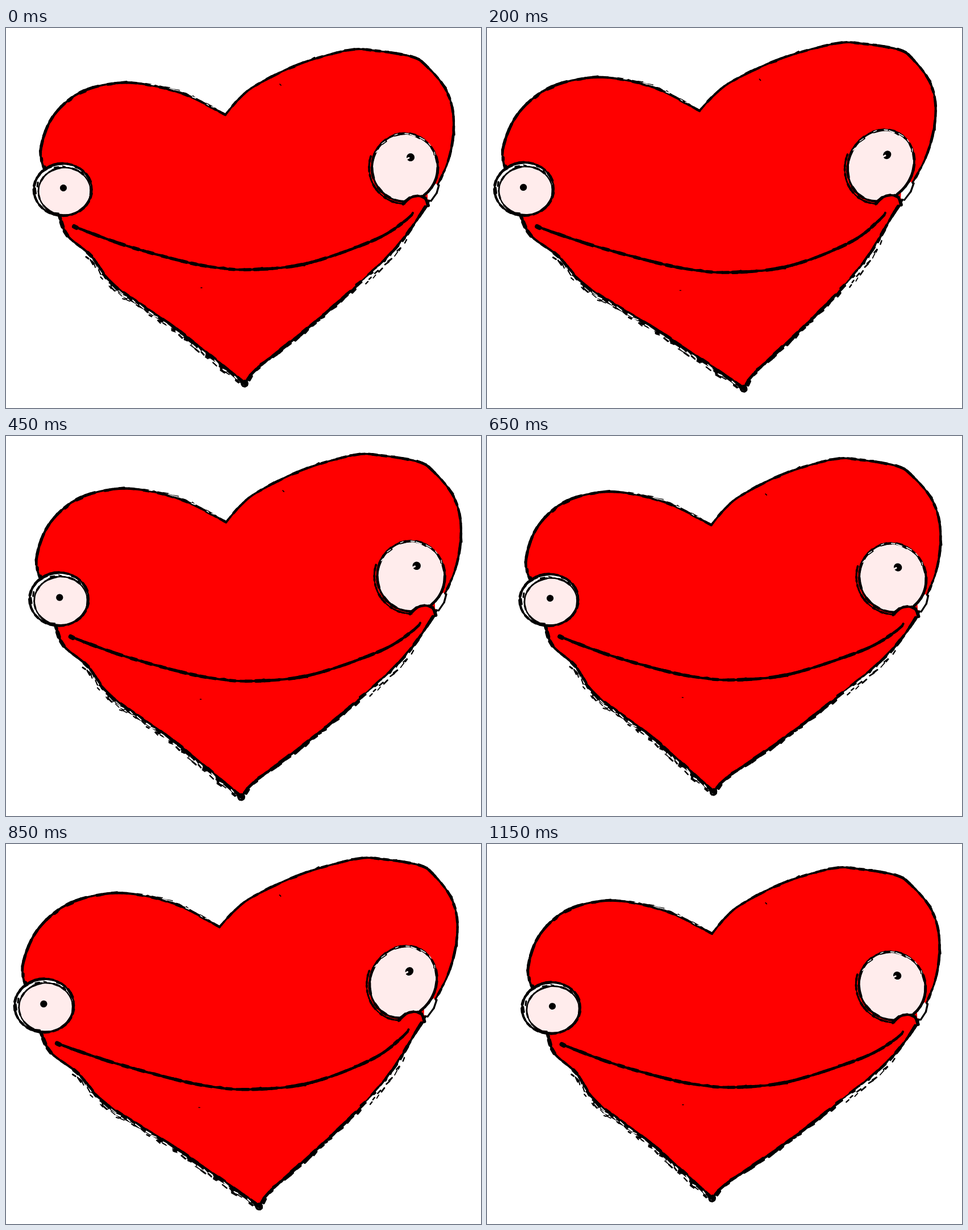
An HTML page with a canvas that plays this animation: 836 px wide and 670 px high, repeating every 1200 ms.

```html
<!DOCTYPE html>
<html lang="en">
<head>
<meta charset="utf-8">
<title>Wobbling heart</title>
<style>
html, body { margin: 0; width: 100%; height: 100%; overflow: hidden; background: #fff; }
canvas { display: block; }
</style>
</head>
<body>
<canvas id="stage" width="836" height="670"></canvas>
<script>
const ctx = document.getElementById('stage').getContext('2d');
const RED = '#f00', BLACK = '#000', WHITE = '#fff', PINK = '#ffecec';

// Landmark x, y, then its shift in three modes: lean left, settle, swing back
const marks = [
  [60, 215, -33, -2, 11, 6, -17, 0],    // left side
  [100, 285, -37, -1, 14, 4, -17, 3],   // left eye
  [255, 101, -15, -10, 5, 3, -8, -8],   // left lobe
  [386, 152, -12, -7, 10, 5, -2, -4],   // cleft
  [628, 39, 12, -12, 5, 4, 15, -11],    // right lobe
  [788, 158, 2, -10, 8, 5, 18, -6],     // right side
  [700, 246, -10, -3, 11, 4, 13, 1],    // right eye
  [716, 327, -15, 0, 16, 5, 15, 4],     // mouth corner
  [430, 426, -5, 5, 5, 3, 2, 9],        // mouth middle
  [187, 455, -15, 2, 3, 2, -10, 8],     // lower left
  [625, 449, 5, 6, -1, 4, 12, 11],      // lower right
  [420, 630, 32, 9, -24, -2, 0, 17]     // tip
];

// Time and amount of each mode
const keys = [
  [0, 0, 0, 0], [200, 1, 0, 0], [280, 0.35, 0, 1.3], [450, 0, 0.25, 0.6], [550, 0, 1, 0.1], [650, 0, 0.9, 0.15],
  [740, 0, 0, 0], [850, 0.8, 0, 0.3], [900, 0.35, 0, 1.35], [950, 0, 0, 1], [1050, 0, 0.4, 0.5], [1100, 0, 1, 0], [1200, 0, 1, 0]
];

function amounts(t) {
  const i = keys.findIndex(k => k[0] > t), a = keys[i - 1], b = keys[i];
  const u = (t - a[0]) / (b[0] - a[0]);
  return [1, 2, 3].map(m => a[m] + (b[m] - a[m]) * u);
}

// Radial weights spread the landmark shifts smoothly over the plane
const kernel = (a, b) => Math.hypot(a[0] - b[0], a[1] - b[1], 50);

function solve(rows, n) {
  for (let c = 0; c < n; c++) {
    const lead = rows[c] = rows[c].map(v => v / rows[c][c]);
    rows.forEach((row, r) => {
      if (r !== c) rows[r] = row.map((v, k) => v - row[c] * lead[k]);
    });
  }
  return rows.map(row => row.slice(n));
}
const weights = solve(marks.map(p => [...marks.map(q => kernel(p, q)), ...p.slice(2)]), marks.length);

const withModes = p => [...p, ...weights[0].map((_, j) =>
  marks.reduce((sum, q, k) => sum + kernel(p, q) * weights[k][j], 0))];

let seed = 11;
const rnd = (a = 0, b = 1) => {
  seed = (seed * 16807) % 2147483647;
  return a + (b - a) * seed / 2147483647;
};

const pairs = (...v) => v.flatMap((x, i) => i % 2 ? [] : [[x, v[i + 1]]]);

// Catmull-Rom samples through the points
function curve(...v) {
  const pts = pairs(...v), last = pts.length - 1, out = [];
  const at = i => pts[Math.max(0, Math.min(last, i))];
  for (let i = 0; i < last; i++) {
    const [p, q, r, s] = [at(i - 1), at(i), at(i + 1), at(i + 2)];
    const n = Math.ceil(Math.hypot(r[0] - q[0], r[1] - q[1]) / 9);
    for (let k = 0; k < n; k++) {
      const u = k / n;
      out.push([0, 1].map(d => q[d] + u / 2 * (r[d] - p[d] + u * (2 * p[d] - 5 * q[d] + 4 * r[d] - s[d]
        + u * (3 * (q[d] - r[d]) + s[d] - p[d])))));
    }
  }
  return [...out, pts[last]];
}

// Elliptic arc, angles in turns
function arc(x, y, rx, ry, from = 0, to = 1, n = 40) {
  return Array.from({ length: n + 1 }, (_, i) => {
    const a = 2 * Math.PI * (from + (to - from) * i / n);
    return [x + rx * Math.cos(a), y + ry * Math.sin(a)];
  });
}

const items = [];
const fill = (pts, color) => items.push({ pts: pts.map(withModes), color });
const ink = (pts, w, rough = 0.25, color = BLACK) =>
  items.push({ pts: pts.map(withModes), color, widths: pts.map(() => w * rnd(1 - rough, 1 + rough)) });

// Short broken strokes along part of a line, lo to hi pixels outside it
function scratch(line, from, to, count, lo, hi, w, color = BLACK) {
  for (let i = 0; i < count; i++) {
    const k = Math.floor((from + (to - from) * (i + rnd()) / count) * (line.length - 2));
    const [x, y] = line[k], [x2, y2] = line[k + 1], d = Math.hypot(x2 - x, y2 - y);
    const dx = (x2 - x) / d, dy = (y2 - y) / d;
    const len = rnd(4, 10), a = rnd(lo, hi), b = a + rnd(-1.5, 1.5);
    ink([[x + dy * a, y - dx * a], [x + dx * len + dy * b, y + dy * len - dx * b]], w, 0.4, color);
  }
}

// Body
const topRight = curve(386,153, 410,125, 440,101, 515,64, 603,39, 650,40, 712,50, 738,65, 775,110, 788,165, 778,235, 742,310);
const lowRight = curve(742,310, 690,384, 625,448, 530,530, 440,602, 421,628);
const lowLeft = curve(421,628, 300,531, 190,454, 150,402, 108,366, 94,331);
const topLeft = curve(69,255, 61,215, 82,157, 130,114, 195,97, 255,101, 320,119, 386,153);
fill([...topRight, ...lowRight, ...lowLeft, ...topLeft], RED);

ink(topRight, 4);
scratch(topRight, 0.1, 1, 24, -1, 1, 3);
ink(topLeft, 4.4);
scratch(topLeft, 0, 0.6, 14, -1.5, 1, 4);
scratch(topLeft, 0.68, 0.88, 8, 0, 3, 2);
scratch(topLeft, 0.7, 0.98, 6, 0, 2, 1.5, WHITE);

ink(lowRight, 5, 0.35);
scratch(lowRight, 0.4, 0.98, 32, -1, 3, 4);
scratch(lowRight, 0.18, 0.42, 14, 2, 5, 4, WHITE);
scratch(lowRight, 0.18, 0.42, 12, 5, 8, 2);
ink(lowLeft, 5.5, 0.35);
scratch(lowLeft, 0.02, 0.65, 40, 0, 4, 4.5);
scratch(lowLeft, 0.02, 0.8, 26, 2, 5, 2.2, WHITE);
scratch(lowLeft, 0.02, 0.82, 30, 4, 8, 2.4);
ink(arc(420, 627, 5, 5), 3);

// Left eye
const leftRim = arc(100, 285, 51, 46);
const leftBall = arc(103, 288, 46, 42);
fill(leftRim, WHITE);
fill(leftBall, PINK);
ink(leftBall, 3, 0.3);
ink(leftRim, 4, 0.3);
scratch(leftRim, 0.3, 0.95, 14, -6, 0, 3);
fill(arc(101, 282, 6, 6), BLACK);

// Right eye
const rightBall = arc(702, 246, 58, 60);
fill(pairs(757,274, 762,282, 750,304, 742,302, 742,288), WHITE);
fill(rightBall, PINK);
ink(rightBall, 4, 0.3);
scratch(rightBall, 0.5, 1, 14, -2, 1, 2.5);
scratch(rightBall, 0.6, 0.98, 8, -1, 1, 1.2, WHITE);
ink(arc(702, 246, 63, 64, 0.25, 0.55), 2.8, 0.5);
ink(pairs(762,277, 758,291, 748,305), 3);
const lip = curve(699,310, 710,300, 724,296, 738,300, 743,313);
fill(lip, RED);
ink(lip, 5);
fill(arc(712, 228, 7, 7), BLACK);
ink(pairs(705,231, 709,229), 3, 0, PINK);

// Smile and specks
const mouth = curve(120,350, 200,380, 290,406, 360,421, 430,426, 530,415, 650,373, 705,338, 716,326);
ink(mouth, 5);
scratch(mouth, 0, 1, 34, -1.5, 1.5, 3);
ink(pairs(120,350, 124,352), 8, 0);
ink(pairs(482,99, 484,101), 1.5);
ink(pairs(343,458, 345,458), 1.6);

ctx.lineCap = ctx.lineJoin = 'round';

function draw(t) {
  const [a, b, c] = amounts(t);
  const place = p => [0, 1].map(d => p[d] + a * p[d + 2] + b * p[d + 4] + c * p[d + 6]);
  ctx.fillStyle = WHITE;
  ctx.fillRect(0, 0, 836, 670);
  for (const { pts, color, widths } of items) {
    const p = pts.map(place);
    ctx.fillStyle = ctx.strokeStyle = color;
    if (!widths) {
      ctx.beginPath();
      p.forEach(q => ctx.lineTo(...q));
      ctx.fill();
      continue;
    }
    for (let i = 1; i < p.length; i++) {
      ctx.lineWidth = widths[i];
      ctx.beginPath();
      ctx.moveTo(...p[i - 1]);
      ctx.lineTo(...p[i]);
      ctx.stroke();
    }
  }
}

function tick() {
  draw(Math.floor(performance.now() % 1200 / 50) * 50);
  requestAnimationFrame(tick);
}
tick();
</script>
</body>
</html>
```
